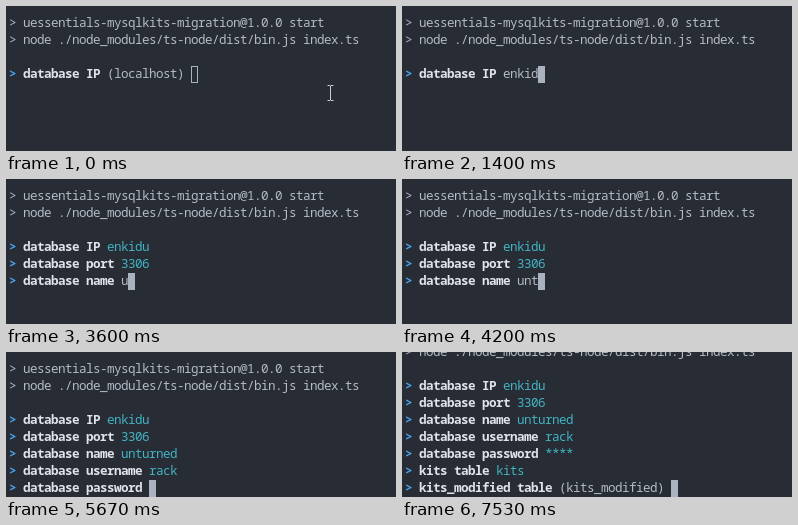
Write an HTML page that moves like this. It is 390 px wide and 145 px high and loops after 8 s.

```html
<!DOCTYPE html>
<html lang="en">
<head>
<meta charset="utf-8">
<title>Terminal prompts</title>
<style>
html, body {
  margin: 0;
  width: 100%;
  height: 100%;
  overflow: hidden;
  background: #282c34;
}
#stage {
  position: relative;
  width: 390px;
  height: 145px;
  overflow: hidden;
  background: #282c34;
  color: #b4bbc7;
  font: 12.6px/17px "Noto Sans Mono", "DejaVu Sans Mono", monospace;
  letter-spacing: calc(7px - 1ch);
  font-variant-ligatures: none;
}
#screen { position: absolute; left: 3px; top: 9px; }
.row { position: relative; top: -1px; height: 17px; white-space: pre; }
.mark { color: #4aa5f0; font-weight: 600; }
.label { color: #e0e4ec; font-weight: 700; }
.done { color: #42b3c2; }
#cursor {
  position: absolute;
  box-sizing: border-box;
  width: 7px;
  height: 17px;
  border: 1px solid #abb2bf;
}
#cursor.focus { background: #abb2bf; }
#mouse { position: absolute; left: 0; top: 79px; }
</style>
</head>
<body>
<div id="stage">
  <div id="screen">
    <div class="row">&gt; uessentials-mysqlkits-migration@1.0.0 start</div>
    <div class="row">&gt; node ./node_modules/ts-node/dist/bin.js index.ts</div>
    <div class="row"></div>
    <div id="cursor"></div>
  </div>
  <svg id="mouse" width="8" height="17" fill="none" stroke="#c8ccd2">
    <path d="M.5 .5H3L3.5 1L4 .5H6.5M3.5 1V15M.5 15.5H3L3.5 15L4 15.5H6.5"/>
  </svg>
</div>
<script>
const LOOP = 8000, CELL = 7, LINE = 17, TOP = 9, FIRST_ROW = 3;

// shown: prompt appears; typing: first and last key; pace < 1 speeds up towards the end
const prompts = [
  { label: 'database IP', hint: '(localhost) ', answer: 'enkidu', shown: 0, typing: [870, 1530] },
  { label: 'database port', hint: '(3306) ', answer: '3306', shown: 1730 },
  { label: 'database name', answer: 'unturned', shown: 2400, typing: [3270, 4730], pace: 0.37 },
  { label: 'database username', answer: 'rack', shown: 4800, typing: [5200, 5530] },
  { label: 'database password', answer: '****', shown: 5670, typing: [6070, 6400] },
  { label: 'kits table', hint: '(kits) ', answer: 'kits', shown: 6600 },
  { label: 'kits_modified table', hint: '(kits_modified) ', answer: '', shown: 7530 }
];

const byId = id => document.getElementById(id);
const screenEl = byId('screen'), cursor = byId('cursor'), mouse = byId('mouse');

const span = (cls, text) => {
  const el = document.createElement('span');
  el.className = cls;
  el.textContent = text;
  return el;
};

const rows = prompts.map(() => {
  const row = document.createElement('div');
  row.className = 'row';
  screenEl.insertBefore(row, cursor);
  return row;
});

// Letters typed by time t, key presses spread over the typing span
function typedText({ answer, typing, pace = 1 }, t) {
  if (!typing || t < typing[0]) return '';
  const [from, to] = typing;
  const part = Math.min(1, (t - from) / (to - from));
  const count = 1 + Math.floor(part ** (1 / pace) * (answer.length - 1) + 1e-6);
  return answer.slice(0, count);
}

function drawPrompts(active, typed) {
  prompts.forEach(({ label, hint = '', answer }, i) => {
    const row = rows[i];
    row.replaceChildren();
    if (i > active) return;
    row.append(
      span('mark', '> '),
      span('label', label + ' '),
      i < active ? span('done', answer) : span('input', typed || hint)
    );
  });
  cursor.style.left = rows[active].textContent.length * CELL + 'px';
  cursor.style.top = (FIRST_ROW + active) * LINE + 'px';
  // The last two prompts no longer fit below
  screenEl.style.top = TOP - (active > 4 ? 2 * LINE : 0) + 'px';
}

let drawn;
function frame(t) {
  const active = prompts.findLastIndex(p => p.shown <= t);
  const typed = typedText(prompts[active], t);
  const state = active + typed;
  if (state !== drawn) {
    drawPrompts(active, typed);
    drawn = state;
  }
  cursor.className = t < 70 ? '' : 'focus';
  mouse.style.visibility = t < 200 ? 'visible' : 'hidden';
  mouse.style.transform = `translateX(${321 + Math.round(t * 0.18)}px)`;
}

const start = performance.now();
function tick() {
  frame((performance.now() - start) % LOOP);
  requestAnimationFrame(tick);
}
tick();
</script>
</body>
</html>
```
